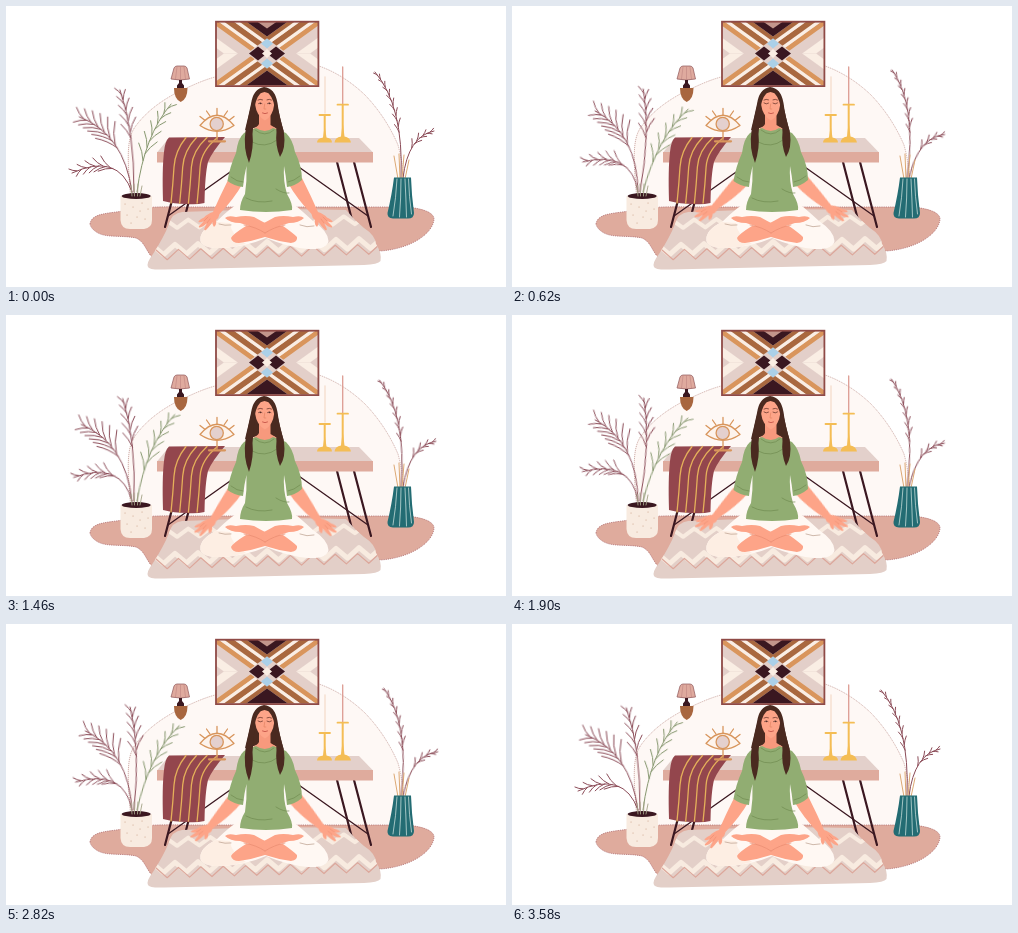
Write an HTML page that moves like this. It is 500x281 px and loops after 3.6 s.

```html
<!DOCTYPE html>
<html lang="en">
<head>
<meta charset="utf-8">
<title>Meditation</title>
<style>
html, body { margin: 0; width: 100%; height: 100%; overflow: hidden; background: #fff; }
svg { display: block; width: 500px; height: 281px; }
.line { fill: none; stroke-linecap: round; stroke-linejoin: round; }
</style>
</head>
<body>
<svg viewBox="0 0 500 281">
  <defs>
    <clipPath id="rugClip"><path id="rugShape" d="M176 206Q260 202 340 204Q348 214 358 222Q369 229 370 238Q376 247 374.500 255Q372 258.500 358 259L158 263.500Q143 264 142 261Q140 257 147 248Q158 231 163 218Q166 207 176 206Z"/></clipPath>
    <clipPath id="artClip"><rect x="-51" y="-32" width="102" height="64"/></clipPath>
  </defs>

  <path d="M126 206C122 160 119 135 129 121Q147 96 185 80Q198 74 209 71L313 60Q338 69 359 89Q380 111 392 139Q400 168 399 206Z" fill="#fef8f5" stroke="#cba6a1" stroke-width=".9" stroke-dasharray="1.200 .8"/>
  <path d="M84 218C86 206 104 208 122 204Q140 200 180 201L385 201C410 200 428 205 428 213C427 228 404 243 374 245L146 251C140 245 139 236 130 232C116 229 102 232 92 227Q85 223 84 218Z" fill="#dfab9d" stroke="#b06f72" stroke-width=".8" stroke-dasharray="1.200 1"/>

  <g id="art" transform="translate(261 47.5)" clip-path="url(#artClip)"></g>
  <rect x="210" y="15.7" width="102.4" height="64.4" fill="none" stroke="#8f4a46" stroke-width="1.8"/>

  <g id="lamp">
    <path d="M168 62Q169 60 171 60H178Q180 60 181 62L183.500 73Q174 75 165 73Z" fill="#dfaa9e" stroke="#8d5558" stroke-width=".7"/>
    <path class="line" d="M171 61L169.500 73M174.500 61V73M178 61L179.500 73" stroke="#b97f7c" stroke-width=".5"/>
    <path d="M173 74H176V77L178 79.500V82H171V79.500L173 77Z" fill="#3a1720"/>
    <path d="M168 82H181.500Q181.500 93 174.700 96Q168 93 168 82Z" fill="#a8663f"/>
  </g>

  <g class="line" stroke="#3a1720" stroke-width="2.200">
    <path d="M331 156L346 214M348 156L365 221M193 156L178 214M176 156L159 221"/>
    <path d="M290 159L362 210M234 159L162 210" stroke-width="1.300"/>
  </g>
  <path d="M163 132H353L367 146.500H151Z" fill="#e3d0cb"/>
  <path d="M151 146H367V156.500H151Z" fill="#dfab9d"/>
  <path d="M163 131.500L219 131Q206 146 202 156Q199 168 198.500 197Q190 199 181 198Q168 198 157 195Q156 163 158 146Q159 135 163 131.500Z" fill="#93464d"/>
  <path id="stripes" class="line" stroke="#e5b05a" stroke-width="1.300"/>

  <g class="line" stroke="#d8955c" stroke-width="1.300">
    <path d="M194 119.500Q211 99 228 119.500Q211 131 194 119.500Z" fill="#fdf3ec"/>
    <circle cx="210.700" cy="118" r="6.600" fill="#e4d0ce"/>
    <path d="M211 109V102.500M204 110L200.500 105M218 110L221.500 105M198.500 114L194 110.500M223.500 114L228 110.500M211 126V134"/>
    <path d="M203 135.300H219" stroke-width="2.200"/>
  </g>

  <g class="line" stroke="#f4bd55">
    <path d="M319 107V71" stroke="#f4dccb" stroke-width="1.300"/>
    <path d="M336.700 98V61" stroke="#dd9c92" stroke-width="1.300"/>
    <path d="M318.700 109V133M336.700 99V133" stroke-width="2"/>
    <path d="M313.500 109H324M331.500 98.700H342" stroke-width="1.800"/>
    <path d="M311 136.500Q311 132.500 317 131.500L318.700 120L320.500 131.500Q326 132.500 326 136.500ZM328.500 136.500Q329 131.500 335 130.500L336.700 116L338.500 130.500Q344 131.500 345 136.500Z" fill="#f4bd55" stroke="none"/>
  </g>

  <use href="#rugShape" fill="#e3cfc8"/>
  <g id="rug" class="line" clip-path="url(#rugClip)"></g>

  <g id="plants"></g>

  <path d="M114.500 190L114.500 214Q115 223 124 223H138Q146 222 146 214V190Z" fill="#f8ebe0"/>
  <ellipse cx="130.200" cy="190" rx="14.500" ry="3" fill="#3a1720"/>
  <path class="line" d="M119 198h.1M127 201h.1M136 197h.1M142 203h.1M121 209h.1M131 211h.1M139 213h.1M125 217h.1M134 205h.1" stroke="#cfa890" stroke-width="1.200"/>
  <path class="line" d="M126 190L125 179M128.500 190L128 178M131.500 190L132 178M134 190L136 180" stroke="#a3a287" stroke-width=".9"/>

  <path class="line" d="M392 173L388 150M394 173L393 148M396 173L398 149M399 173L403 154" stroke="#dca873" stroke-width="1"/>
  <path d="M388 171.500H405Q405.500 188 408 207Q408 212.500 402 212.500H387Q381 212 381.500 207Q386 188 388 171.500Z" fill="#236c73"/>
  <path class="line" d="M391 173Q390 192 387 210M395 173Q395 192 393.500 211M399 173Q400 192 400.500 211M402.500 173Q403 190 405.500 208" stroke="#c4dcd8" stroke-width=".8"/>

  <g id="woman">
    <path d="M236 195Q224 202 210 216Q193 224 194.500 235Q197 243 217 242Q242 240 260 232Q281 241 302 243Q321 244 322.500 235Q322 225 307 215Q294 203 284 195Z" fill="#fff8f3"/>
    <path d="M210 216Q193 224 194.500 235Q197 243 217 242Q229 241 240 238Q225 229 224 217Z" fill="#fdeee3"/>
    <g fill="#fda488">
      <path d="M240 220Q227 228 225 232Q226 237 233 237Q247 235 259 231Q271 235 285 237Q292 236 291 231Q287 227 277 220Z"/>
      <path id="foot" d="M219 212Q222 209 230 211Q240 209 248 211Q255 215 263 219L252 222Q242 220 234 217Q224 217 219 212Z"/>
      <use href="#foot" transform="translate(517 0) scale(-1 1)"/>
    </g>
    <path class="line" d="M238 219Q250 221 259 227M279 219Q268 221 259 227" stroke="#e98b70" stroke-width=".7"/>
    <path class="line" d="M213 218Q219 220 225 219M294 219Q301 222 308 220" stroke="#b99c8c" stroke-width=".7"/>

    <path d="M258 81Q247 83 245 98Q242 112 239 124L252 121H267L278 126Q273 110 271.500 97Q269 82 258 81Z" fill="#4a2a20"/>
    <path d="M253 108H264.500V119Q269 122 274 124L259 133L244 124Q252 121 253 118Z" fill="#f7997d"/>
    <path d="M258.500 86Q268.500 87 268.300 98Q267 110 259 114.500Q250.500 110 249 98Q249 87 258.500 86Z" fill="#fda488"/>
    <path d="M258.500 84Q250 89 248.500 102Q245 93 251 85ZM258.500 84Q267 89 268.800 102Q272 93 266 85Z" fill="#4a2a20"/>

    <g id="arms"></g>

    <path d="M250 122Q259 128 267 122Q274 124 280 127Q287 134 289 146Q296 160 296 174Q289 180 281 181Q280 170 278 160Q277 175 281 188Q287 198 286 204Q260 208 234 204Q234 196 239 188Q241 175 240.500 160Q238 170 237 181Q228 180 221.500 175Q224 160 230 147Q232 132 238 127Q244 124 250 122Z" fill="#91ad72"/>
    <path class="line" d="M249 124Q259 132 268 124M246 136Q259 143 271 134M240 192Q251 198 266 195M270 183Q278 188 283 187M225 171Q231 176 237 176M282 176Q288 175 294 170" stroke="#708c51" stroke-width=".7"/>
    <path d="M246 96Q242 112 239.500 125Q237 142 243 157Q248 142 246.500 128Q248 114 248.500 101ZM270.500 96Q274 112 278 127Q280 142 274 151Q269 139 270.500 126Q270 113 268.500 101Z" fill="#4a2a20"/>

    <g class="line" stroke="#5a2b23" stroke-width=".7">
      <path d="M252 94Q254 92.700 256.500 93.800M261 93.800Q263.500 92.700 265.500 94"/>
      <path d="M258.700 98L258 103H259.800" stroke="#e0805f" stroke-width=".6"/>
      <path d="M256.500 107Q259 108.500 261.500 107" stroke="#c8574b" stroke-width=".9"/>
      <path id="shut" d="M252 97Q254.200 98.800 256.500 97.200M261 97.200Q263.300 98.800 265.500 97"/>
      <g id="open">
        <path d="M252.500 97.500Q254.300 96 256 97.500M261.500 97.500Q263.500 96 265 97.500" fill="#fff"/>
        <path d="M254.300 97.500h.1M263.300 97.500h.1" stroke-width="1.500"/>
      </g>
    </g>
  </g>
</svg>
<script>
const BEAT = 1200;
const $ = id => document.getElementById(id);

function add(parent, tag, attrs) {
  const el = document.createElementNS('http://www.w3.org/2000/svg', tag);
  for (const k in attrs) el.setAttribute(k, attrs[k]);
  return parent.appendChild(el);
}

// Swing to an angle and back once per beat.
function swing(el, x, y, deg, lag = 0) {
  el.style.transformOrigin = `${x}px ${y}px`;
  el.animate(
    [{ transform: 'rotate(0deg)', easing: 'cubic-bezier(.364,0,.636,1)' }, { transform: `rotate(${deg}deg)` }],
    { duration: BEAT / 2, direction: 'alternate', iterations: Infinity, delay: lag - BEAT });
}

function blink(el, start, end) {
  const a = start / BEAT, b = end / BEAT;
  el.animate([[1, 0], [1, a], [0, a], [0, b], [1, b], [1, 1]].map(
    ([v, offset]) => ({ opacity: el.id === 'open' ? v : 1 - v, offset })),
    { duration: BEAT, iterations: Infinity });
}

// Curved stem with alternating leaflets that open outwards.
function fern([x0, y0, x1, y1, x2, y2], count, size, from, spread) {
  let d = `M${x0} ${y0}Q${x1} ${y1} ${x2} ${y2}`;
  for (let i = 0; i < count; i++) {
    const t = from + (1 - from) * i / count, u = 1 - t;
    const x = u * u * x0 + 2 * u * t * x1 + t * t * x2;
    const y = u * u * y0 + 2 * u * t * y1 + t * t * y2;
    const dir = Math.atan2(u * (y1 - y0) + t * (y2 - y1), u * (x1 - x0) + t * (x2 - x1));
    const len = size * (1 - .5 * i / count);
    const side = i % 2 ? 1 : -1;
    const a = dir + side * spread * .6, b = dir + side * spread;
    d += `M${x} ${y}q${len * .5 * Math.cos(a)} ${len * .5 * Math.sin(a)} ${len * Math.cos(b)} ${len * Math.sin(b)}`;
  }
  return d;
}

const wine = '#8a4a56', green = '#84956c';
[
  { stem: [128, 186, 128, 125, 113, 84], n: 9, size: 17, from: .48, spread: .5, deg: 10.5, lag: 85, color: wine },
  { stem: [126, 186, 118, 128, 73, 111], n: 12, size: 24, from: .45, spread: .6, deg: 7.5, lag: 70, color: wine },
  { stem: [126, 186, 112, 146, 66, 167], n: 10, size: 15, from: .45, spread: .6, deg: 11, lag: 0, color: wine },
  { stem: [131, 186, 138, 130, 165, 98], n: 10, size: 18, from: .3, spread: .5, deg: 7.5, lag: 30, color: green },
  { stem: [395, 172, 398, 100, 369, 66], n: 13, size: 9, from: .35, spread: .4, deg: 6, lag: 0, color: wine },
  { stem: [397, 172, 402, 130, 428, 125], n: 7, size: 9, from: .45, spread: .5, deg: 6, lag: 0, color: wine }
].forEach(p => {
  const el = add($('plants'), 'path', {
    class: 'line', d: fern(p.stem, p.n, p.size, p.from, p.spread), stroke: p.color, 'stroke-width': 1
  });
  swing(el, p.stem[0], p.stem[1], p.deg, p.lag);
});

// Woven picture: one quarter, mirrored both ways.
add($('art'), 'rect', { x: -51, y: -32, width: 102, height: 64, fill: '#e3cfc9' });
const SLOPE = .72;
const bands = [[-31, -21, '#faeee4'], [-9, -3, '#d9955c'], [-3, 1, '#faeee4'], [1, 8, '#a9683f'],
  [8, 12, '#faeee4'], [12, 17, '#a9683f'], [17, 34, '#3a1720']];
for (const sx of [-1, 1]) for (const sy of [-1, 1]) {
  const q = add($('art'), 'g', { transform: `scale(${sx} ${sy})` });
  for (const [a, b, fill] of bands) {
    const at = c => c < 0 ? `${-c / SLOPE} 0` : `0 ${c}`;
    add(q, 'path', { d: `M${at(a)}L60 ${60 * SLOPE + a}V${60 * SLOPE + b}L${at(b)}Z`, fill });
  }
}
const diamond = (x, y, w, h, fill) =>
  add($('art'), 'path', { d: `M${x - w} ${y}L${x} ${y - h}L${x + w} ${y}L${x} ${y + h}Z`, fill });
diamond(0, 0, 20, 15, '#e3cfc9');
diamond(0, -32, 10, 7, '#c3968c');
for (const s of [-1, 1]) {
  diamond(9 * s, 0, 9, 7, '#3a1720');
  diamond(0, 10 * s, 6, 5, '#abd0e8');
}
diamond(0, 0, 5, 4.5, '#faeee4');

function zigzag(x0, y0, x1, y1, n, amp, stroke, width) {
  let d = '';
  for (let i = 0; i <= n; i++) {
    const k = i / n;
    d += `${i ? 'L' : 'M'}${x0 + (x1 - x0) * k} ${y0 + (y1 - y0) * k + (i % 2 ? amp : -amp)}`;
  }
  add($('rug'), 'path', { d, stroke, 'stroke-width': width });
}
zigzag(160, 218, 360, 214, 18, 4, '#f8ebe0', 4);
zigzag(146, 244, 376, 237, 20, 5, '#f8ebe0', 5);
zigzag(150, 249, 374, 243, 20, 5, '#dca79b', 1.2);

$('stripes').setAttribute('d', [0, 1, 2, 3].map(i => {
  const top = 180 + i * 10.5, foot = 165 + i * 8.7;
  return `M${top} 131.5Q${foot + 4} 145 ${foot + 3} 161Q${foot + 2} 178 ${foot} 197`;
}).join(''));

for (const flip of ['', 'translate(519 0) scale(-1 1)']) {
  const side = add($('arms'), 'g', { transform: flip });
  const arm = add(side, 'g', {});
  add(arm, 'path', {
    d: 'M223 172L237 177Q228 193 213.500 208Q213 212 210 214Q211 219 208 221Q206 218 206.500 216Q203 221 200 224Q197 225 199 221L201 217Q197 221 193.500 221.500Q191.500 221 195 218L198 215Q194 217 192.500 216Q192 214.500 198 211.500Q201 208 207 206Q214 190 223 172Z',
    fill: '#fda488'
  });
  add(arm, 'path', { class: 'line', d: 'M201 217L204 213M198 215L202 211', stroke: '#e98b70', 'stroke-width': .6 });
  swing(arm, 230, 173, 14);
}

blink($('open'), 300, 1150);
blink($('shut'), 300, 1150);
</script>
</body>
</html>
```
